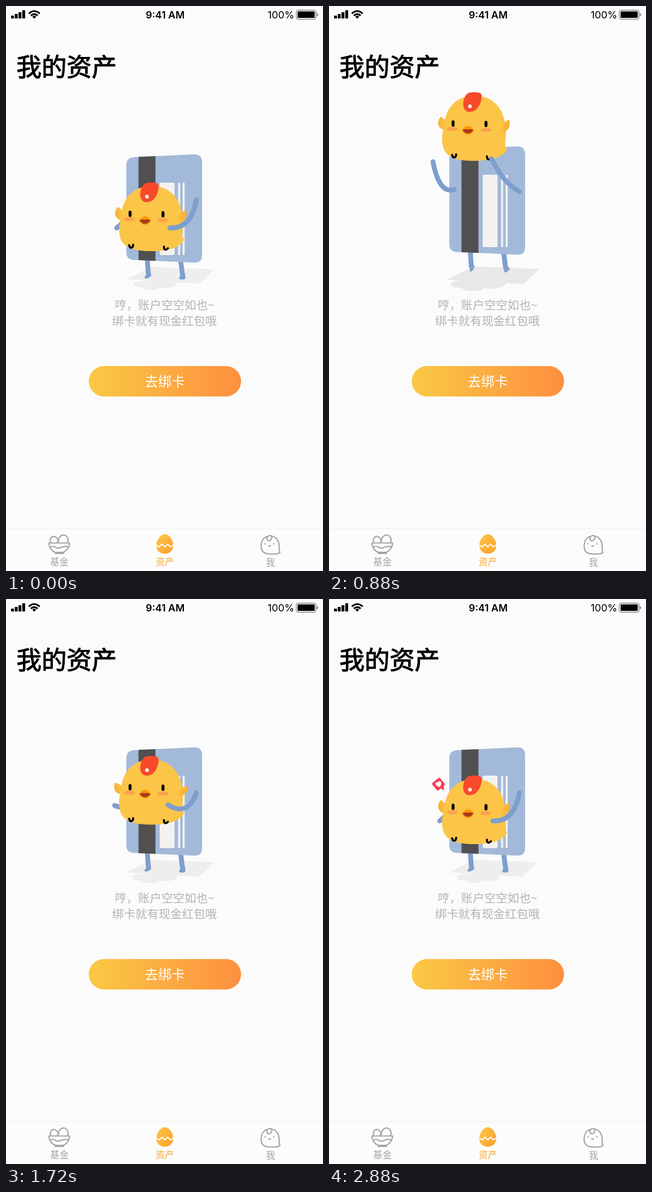
An HTML page for the animation above (3040 ms loop, 561 by 998 pixels).

```html
<!DOCTYPE html>
<html lang="zh-CN">
<head>
<meta charset="utf-8">
<title>我的资产</title>
<style>
html, body { margin: 0; width: 100%; height: 100%; overflow: hidden; background: #fbfbfb; }
svg { display: block; width: 561px; height: 998px; }
text { font-family: "Noto Sans CJK SC", "Noto Sans CJK", "Noto Sans", sans-serif; }
.status { font-family: Inter, Roboto, sans-serif; }
.title { font-weight: 500; stroke: #000; stroke-width: 1.1; }
.mid { text-anchor: middle; }
.limb { fill: none; stroke: #7e9fcd; stroke-width: 8.6; stroke-linecap: round; }
.icon { fill: none; stroke: #a5a5a5; stroke-width: 2.2; stroke-linecap: round; stroke-linejoin: round; }
</style>
</head>
<body>
<svg viewBox="0 0 561 998">
  <defs>
    <linearGradient id="button"><stop stop-color="#fac944"/><stop offset="1" stop-color="#fd8f3f"/></linearGradient>
    <linearGradient id="egg" x2="1" y2="1"><stop stop-color="#fcc748"/><stop offset="1" stop-color="#fa9f2a"/></linearGradient>
    <linearGradient id="wingL"><stop stop-color="#f9b234"/><stop offset="1" stop-color="#fbc145"/></linearGradient>
    <linearGradient id="wingR"><stop offset=".15" stop-color="#fbc548"/><stop offset="1" stop-color="#f9ab2d"/></linearGradient>
  </defs>
  <rect width="561" height="998" fill="#fbfbfb"/>

  <!-- status bar -->
  <path d="M9 17h5v5h-5zM15.6 14h5v8h-5zM22.2 11h5v11h-5zM28.8 7.5h5v14.5h-5z"/>
  <path fill="none" stroke="#000" stroke-width="3" d="M40.3 13.3Q50 4.8 59.7 13.3M44 17Q50 11.8 56 17"/>
  <path d="M46.6 18.7Q50 16 53.4 18.7L50 22.4Z"/>
  <text class="status mid" x="281.7" y="21.8" font-size="17.6" font-weight="600">9:41 AM</text>
  <text class="status" x="463" y="21.8" font-size="17.8">100%</text>
  <rect x="513.7" y="7.3" width="35" height="16" rx="3.6" fill="none" stroke="#777" stroke-width="1.2"/>
  <rect x="516" y="9.6" width="30.4" height="11.4" rx="1.6"/>
  <path d="M550.2 12.5Q552.4 13.2 552.4 15.4T550.2 18.3Z" fill="#777"/>

  <text class="title" x="18.5" y="123.5" font-size="44.4">我的资产</text>

  <g id="shadow">
    <path id="cardShade" d="M213 483L250 464Q254 461 260 461L369 465L342 490.5Z"/>
    <path id="blob" d="M227 491C229 484 245 487 258 485C280 483 301 486 301 491C301 496 285 500 271 497.5C268 503 247 504 240 496.5C230 497 226 495 227 491Z"/>
  </g>

  <!-- card -->
  <path id="legL" class="limb"/>
  <path id="legR" class="limb"/>
  <path id="footL" fill="#7e9fcd" d="M248 470L256 470L257 477Q250 482 246 481.5Q243.5 479 248 475Z"/>
  <path id="footR" fill="#7e9fcd" d="M308.5 473L317 473L317.5 482Q312 484 307 482.8Q305 479.5 309 476.5Z"/>
  <g id="card">
    <path fill="#a2b9da" d="M213 281Q213 268 226 267L333 262Q347 261.5 347 276L347 440Q347 454 333 453.3L226 448.5Q213 448 213 435Z"/>
    <path fill="#505050" d="M234.5 266.6L264.5 265.2V450.2L234.5 448.9Z"/>
    <g fill="#f3f2ef">
      <rect x="272" y="312" width="26.3" height="128" rx="3"/>
      <rect x="304.6" y="312" width="3.6" height="128" rx="1.6"/>
      <rect x="312.6" y="312" width="3.6" height="128" rx="1.6"/>
    </g>
  </g>
  <path id="armL" class="limb"/>

  <!-- chick -->
  <g id="chick">
    <path id="wingLeft" fill="url(#wingL)" d="M198 355Q204 358 207 365L206 378Q195 378 193 368Q193 360 198 355Z"/>
    <path fill="#fbc548" d="M258 318C290 318 311 340 313 378C314 392 311 402 312 407Q313 411 316 411C309 428 285 433 256 433C228 433 209 427 203 412C197.5 396 201 380 204 367C208 336 228 318 258 318Z"/>
    <path id="wingRight" fill="url(#wingR)" d="M318.5 360Q321.5 369 317.5 376Q312 384 304 384L300 379Q305 367 318.5 360Z"/>
    <path fill="#f9492b" d="M247 313Q257 310.5 267 313Q271 315 270 321C269 333 262 346 250 346.5C241 347 237 340 237.5 332C238 324 241 316 247 313Z"/>
    <circle cx="249.5" cy="336.7" r="3.2" fill="#fff"/>
    <g fill="#fba24e">
      <ellipse cx="218.2" cy="376.7" rx="10.2" ry="3.6"/>
      <ellipse cx="277.8" cy="378.3" rx="10.2" ry="3.6"/>
    </g>
    <rect x="217" y="361.5" width="5.2" height="11" rx="2.6"/>
    <rect x="275.2" y="362.3" width="5.2" height="11" rx="2.6"/>
    <path fill="#fa9b08" d="M235 379Q241 371 246 371Q251 371 257 379Q252 387 246 387Q240 387 235 379Z"/>
    <path fill="#a63a1c" d="M236.5 378.5Q241 376 246 377.5Q251 376 255.5 378.5Q252 384.5 246 384.5Q240 384.5 236.5 378.5Z"/>
    <path fill="none" stroke="#000" stroke-width="3.6" stroke-linecap="round" d="M218 422.5Q218.5 427 221.5 427Q225 426.5 225 421.5M279.5 425Q279.5 430.5 282.5 430.5Q284.5 430.5 286.5 428"/>
  </g>
  <path id="armR" class="limb"/>
  <g id="heart">
    <rect x="-9" y="-8.5" width="18" height="17" rx="3" fill="#f8405a" transform="translate(193.7 327) rotate(-40)"/>
    <path fill="#f8405a" d="M196 334L203 329L203.5 338Z"/>
    <path fill="#fff" transform="translate(194 327) rotate(-22)" d="M0 5.5C-8 0-5-5-2-4.5Q-.5-4 0-2.5Q.5-4 2-4.5C5-5 8 0 0 5.5Z"/>
  </g>

  <g class="mid" fill="#b3b3b3" font-size="20.6">
    <text x="280.5" y="535.5">哼，账户空空如也~</text>
    <text x="280.5" y="564.3">绑卡就有现金红包哦</text>
  </g>
  <rect x="146.5" y="636" width="269.5" height="53.7" rx="26.85" fill="url(#button)"/>
  <text class="mid" x="281" y="672" font-size="23.7" fill="#fff">去绑卡</text>

  <!-- tab bar -->
  <rect y="923" width="561" height="75" fill="#fcfcfc"/>
  <rect y="922.5" width="561" height="2" fill="#f6f6f6"/>
  <g class="icon">
    <path d="M76 948.5H112.5C112.5 956 107 963 101 965H87.5C81 963 76 956 76 948.5ZM87 967H102"/>
    <path d="M79 948C77 941 81 936.5 85.5 937Q90 938 93.5 945M91 948C92 940 97 934 102.5 934.5C108.5 935 111.5 942 109 948"/>
    <path d="M78.5 956Q83 953 87.5 956T97 956.5T110 955"/>
  </g>
  <path fill="url(#egg)" d="M281 933C289 933 296 944 296 953C296 962 289.5 967.5 281 967.5S266 962 266 953C266 944 273 933 281 933Z"/>
  <path fill="none" stroke="#fff" stroke-width="2" stroke-linejoin="round" d="M266 952L271 955.5L276 950.5L281 955.5L286 950.5L291 955.5L296 952"/>
  <g class="icon">
    <path d="M462 937C455 939 451.5 946 451.5 954C451.5 964 457 968 467 968H477Q482 968 485 965Q483 963 483.5 957C484 945 478 937.5 470.5 936.5"/>
    <path d="M462 938Q466 933.5 470.5 936.5C471 941 468 945 465 945Q461 944 462 938Z"/>
    <path d="M458.5 949.5V950.5M474 949.5V950.5M465 953.5Q466.5 955 468 953.5"/>
  </g>
  <g class="mid" font-size="16.6" fill="#a5a5a5">
    <text x="94.5" y="988">基金</text>
    <text x="281" y="988" fill="#faa92f">资产</text>
    <text x="468" y="989">我</text>
  </g>
</svg>
<script>
const LOOP = 3040, STEP = 40, LAST = 2880, FLAPS = 13;
const part = {};
document.querySelectorAll('svg [id]').forEach(el => part[el.id] = el);

// Arm poses relative to the card: hand x, y and elbow x, y
const leftArm = {
  shoulder: [222, 338], hold: [196, 392, 216, 378], toss: [184, 289, 195, 347], wait: [188, 334, 214, 375]
};
const rightArm = {
  shoulder: [337, 342], hold: [290, 392, 328, 394], toss: [288, 284, 308, 326], wait: [283, 332, 314, 376]
};

const progress = (t, from, to) => Math.min(Math.max((t - from) / (to - from), 0), 1);
const ease = (t, from, to) => { const u = progress(t, from, to); return u * u * (3 - 2 * u); };
const bump = (t, from, to) => Math.sin(Math.PI * progress(t, from, to));
const mix = (a, b, u) => a.map((v, i) => v + (b[i] - v) * u);

const set = (name, key, value) => part[name].setAttribute(key, value);
const move = (name, transform) => set(name, 'transform', transform);
const scaleAt = (name, x, y, sx, sy = sx) =>
  move(name, `translate(${x} ${y}) scale(${sx} ${sy}) translate(${-x} ${-y})`);
const curve = (name, x, y, cx, cy, ex, ey) => set(name, 'd', `M${x} ${y}Q${cx} ${cy} ${ex} ${ey}`);

function drawArm(name, arm, t, card) {
  let pose = mix(arm.hold, arm.toss, ease(t, 540, 800));
  pose = mix(pose, arm.wait, ease(t, 880, 1200));
  pose = mix(pose, arm.hold, ease(t, 1580, 1850));
  curve(name, ...pose, ...arm.shoulder);
  move(name, `translate(0 ${card})`);
}

function draw(t) {
  const crouch = ease(t, 0, 400) - ease(t, 440, 560);
  const caught = bump(t, 1840, 2040);
  const rise = 1 - (1 - progress(t, 540, 900)) ** 2;
  const fall = progress(t, 900, 1865) ** 1.49;
  const height = 160 * rise * (1 - fall);
  const card = 5 * crouch - 14 * bump(t, 600, 1140) + 2 * bump(t, 1120, 1280) + 4 * caught;

  move('chick', `translate(0 ${4.5 * crouch + 4 * caught - height})`);
  move('card', `translate(0 ${card})`);

  const flap = 23 * (1 - Math.cos(2 * Math.PI * FLAPS * t / LAST));
  move('wingLeft', `rotate(${-flap} 206 371)`);
  move('wingRight', `rotate(${flap} 308 374)`);

  drawArm('armL', leftArm, t, card);
  drawArm('armR', rightArm, t, card);

  const lift = Math.min(card, 0), sink = Math.max(card, 0), bend = sink / 5;
  curve('legL', 250 - 2 * bend, 446 + card, 251 - 12 * bend, 462 + card, 252, 474 + lift);
  curve('legR', 309 + 5 * bend, 449 + card, 311 + 13 * bend, 464 + card, 312.5 - bend, 476 + lift);
  move('footL', `translate(0 ${lift}) rotate(${lift * 2.6} 252 474)`);
  move('footR', `translate(0 ${lift}) rotate(${lift * 2.6} 313 476)`);

  const gray = Math.round(238 - 1.8 * sink + 0.43 * lift);
  set('shadow', 'fill', `rgb(${gray},${gray},${gray})`);
  scaleAt('cardShade', 291, 476, 1 - 0.007 * sink - 0.0035 * lift);
  scaleAt('blob', 264, 492, 1 - 0.007 * sink + 0.0019 * height, 1 + 0.0012 * height);

  scaleAt('heart', 200, 335, ease(t, 2160, 2280) + 0.15 * bump(t, 2200, 2320));
}

const start = performance.now();
function tick() {
  const t = (performance.now() - start) % LOOP;
  draw(Math.min(Math.floor(t / STEP) * STEP, LAST));
  requestAnimationFrame(tick);
}
tick();
</script>
</body>
</html>
```
